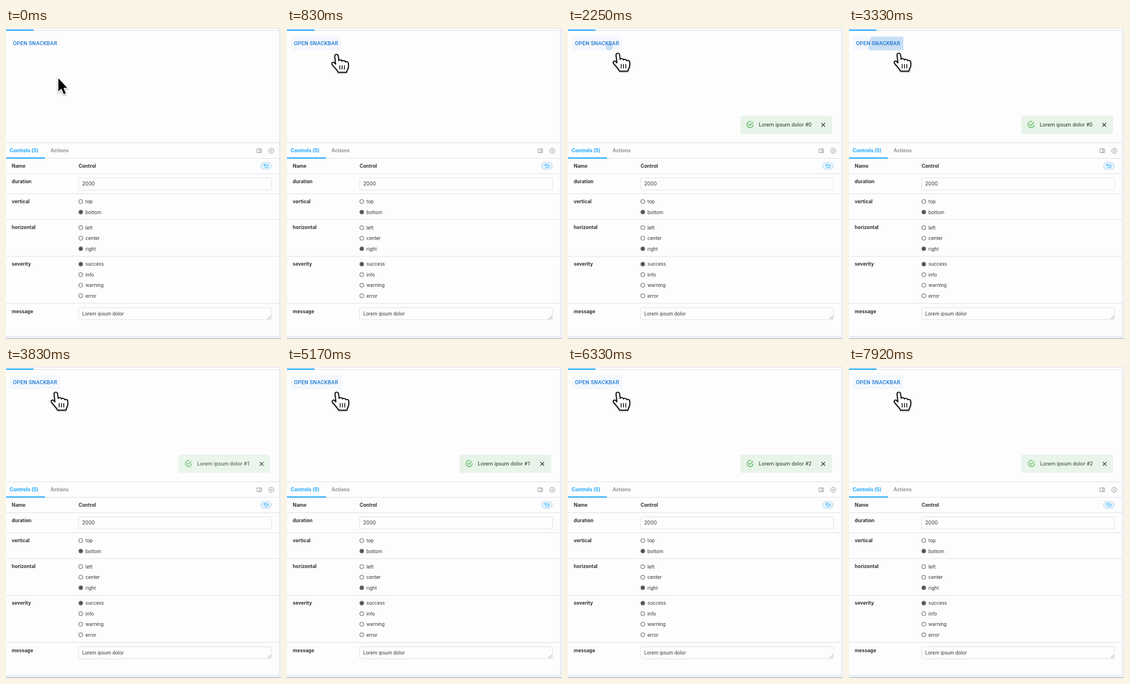
An HTML page for the animation above (8 s loop, 480 by 543 pixels).

```html
<!DOCTYPE html>
<html lang="en">
<head>
<meta charset="utf-8">
<title>Snackbar queue</title>
<style>
  html, body { margin: 0; width: 480px; height: 543px; overflow: hidden; }
  svg { display: block; }
  text { font: 8.25px Inter, sans-serif; fill: #333; white-space: pre; }
  .bold { font-size: 8.45px; font-weight: 700; }
  .roboto { font: 9.2px Roboto, sans-serif; letter-spacing: .0985px; }
  .button { font-weight: 500; letter-spacing: .263px; fill: #1976d2; }
  .line { fill: none; stroke: #dfe2e8; }
  .icon { fill: none; stroke: #8d8d92; stroke-width: .9; }
  .blue { fill: #1ea7fd; }
  .cursor { filter: drop-shadow(0 1.2px 1.2px #0006); }
</style>
</head>
<body>
<svg width="480" height="543" viewBox="0 0 480 543">
  <clipPath id="buttonClip"><rect x="7" y="15" width="88" height="24" rx="2.6"/></clipPath>

  <rect width="480" height="543" fill="#eef2f7"/>
  <path d="M0 0H477V536q0 2-2 2H0Z" fill="#fdfdfe"/>
  <path class="line" d="M477.3 0V536q0 2.3-2.3 2.3H0M0 .5H480M0 4.5H477M0 200.5H477M0 227.5H477"/>
  <path d="M0 542.5H480" stroke="#a4a7ac"/>
  <rect class="blue" y="2.6" width="48" height="2.2"/>
  <rect class="blue" y="226" width="68" height="2"/>

  <rect id="hover" x="7" y="15" width="88" height="24" rx="2.6" fill="#1976d2"/>
  <g id="ripples" clip-path="url(#buttonClip)" fill="#1976d2"></g>
  <text class="roboto button" x="12.2" y="30.4">OPEN SNACKBAR</text>

  <text class="bold" x="6.3" y="217" style="fill:#1ea7fd;font-size:8.7px">Controls (5)</text>
  <text class="bold" x="77.8" y="217" style="fill:#929297">Actions</text>
  <path class="icon" d="M438 211H446V217.6H438ZM443 211V217.6M444.4 212.8V213.6M444.4 214.8V215.6"/>
  <path class="icon" d="M461.2 212.6L464.8 216.2M464.8 212.6L461.2 216.2"/>
  <circle class="icon" cx="463" cy="214.4" r="4.4"/>

  <rect x="444.3" y="234.9" width="18.8" height="11.8" rx="5.9" fill="#e2f2fd" stroke="#b5d3e6" stroke-width=".9"/>
  <path d="M451.9 237.2L449.8 239.2L451.9 241.2M450 239.2H455.6Q457.6 239.2 457.6 241.2T455.6 243.2H451.6" fill="none" stroke="#1ea7fd"/>

  <g id="panel"></g>

  <rect class="line" x="126.7" y="261.5" width="336.8" height="21.3" rx="2.6"/>
  <text x="133" y="275.4" style="font-size:8.8px">2000</text>
  <rect class="line" x="126.7" y="488.3" width="336.8" height="21" rx="2.6"/>
  <text x="133" y="502">Lorem ipsum dolor</text>
  <path class="icon" d="M456.6 508.4L462.6 502.4M460 508.4L462.6 505.8"/>

  <g id="snackbar">
    <rect x="301" y="153" width="160" height="32" rx="2.6" fill="#e8f4e9"/>
    <g id="content">
      <g transform="translate(310.7 161.3) scale(.6)" fill="none" stroke="#4caf50" stroke-width="2">
        <path d="M21 12A9 9 0 1 1 14.8 3.5M7.2 10.8L11 14.6L20.3 5.3"/>
      </g>
      <text id="message" class="roboto" x="333" y="171.7" style="fill:#1e3a20"></text>
      <path d="M442.2 165.8L448.8 172.4M448.8 165.8L442.2 172.4" stroke="#1e2f20" stroke-width="1.2"/>
    </g>
  </g>

  <g class="cursor">
    <path id="arrow" d="M.6 .6V27.5L6.5 22.2L10.4 31.6L15.4 29.5L11.4 20.2H18.6Z" stroke="#fff" stroke-width="1.6" stroke-linejoin="round"/>
    <g id="hand" stroke="#000" stroke-width="1.7" stroke-linejoin="round" stroke-linecap="round">
      <path fill="#fff" d="M-3.1 3C-3.2-1 2.7-1 3 3L4 11C5 8.6 9.4 9 9.7 12C11 9.8 15 10.4 15.3 13.2C17.5 11.6 20.8 13 20.8 16V21C20.8 25 18 27 17.5 31.3H3C1.5 27-4 22.5-7.5 17.8C-9.4 14.6-6 12.4-3.6 14.8L-1.5 17Z"/>
      <path d="M5.8 19.5V26M9.8 19.5V26M13.8 19.5V26" fill="none" stroke-width="1.4"/>
    </g>
  </g>
</svg>
<script>
  const $ = id => document.getElementById(id);
  const clamp = u => Math.min(1, Math.max(0, u));
  const ease = u => (u = clamp(u), u * u * (3 - 2 * u));
  const set = (el, attrs) => { for (const key in attrs) el.setAttribute(key, attrs[key]); };

  const label = (x, y, s) => `<text class="bold" x="${x}" y="${y}">${s}</text>`;
  const radio = (y, s, checked) =>
    `<circle cx="130.5" cy="${y}" r="3.5" fill="${checked ? '#77777b' : '#fff'}" stroke="#5b5b60"/>` +
    (checked ? `<circle cx="130.5" cy="${y}" r="2.1" fill="#48484c"/>` : '') +
    `<text x="138.8" y="${y + 3.1}">${s}</text>`;

  // Row: name, label baseline, bottom rule, options, first option, checked option
  const rows = [
    ['duration', 271, 289.5, [], 0, 0],
    ['vertical', 306, 334.5, ['top', 'bottom'], 303, 1],
    ['horizontal', 351.4, 398.8, ['left', 'center', 'right'], 348.6, 2],
    ['severity', 415.4, 480.8, ['success', 'info', 'warning', 'error'], 412.3, 0],
    ['message', 497.6, 0, [], 0, 0],
  ];
  $('panel').innerHTML = label(10, 244, 'Name') + label(126.7, 244, 'Control') +
    '<path class="line" d="M0 254.5H477"/>' +
    rows.map(([name, y, rule, options, first, checked]) =>
      label(10, y, name) +
      (rule ? `<path class="line" d="M0 ${rule}H477"/>` : '') +
      options.map((s, i) => radio(first + i * 18.4, s, i === checked)).join('')
    ).join('');

  const LOOP = 8000, TICK = 1000 / 12;
  const clicks = [16, 27, 37, 53];   // in ticks
  $('ripples').innerHTML = clicks.map(() => '<circle cx="72" cy="33"/>').join('');
  const ripples = [...$('ripples').children];

  function drawCursor(time) {
    const u = ease((time - 290) / 630);
    const x = 90 - 3 * u - 15 * u * (1 - u), y = 85 - 41 * u;
    const over = y < 54;
    set($('arrow'), { transform: `translate(${x} ${y})`, visibility: over ? 'hidden' : 'visible' });
    set($('hand'), { transform: `translate(${x} ${y})`, visibility: over ? 'visible' : 'hidden' });
    set($('hover'), { opacity: over ? .04 : 0 });
  }

  function drawRipples(tick) {
    ripples.forEach((circle, i) => {
      const age = tick - clicks[i];
      const alive = age >= 0 && age < 10;
      set(circle, {
        r: 6.5 + 72 * ease(age * TICK / 550),
        opacity: alive ? .2 * Math.min(1, (9 - age) / 6) : 0,
      });
    });
  }

  // Each queued message takes 26 ticks: 24 on screen, 2 empty
  function drawSnackbar(tick) {
    const since = tick - 20, age = since % 26;
    const moving = age === 0 || age === 23;
    const opacity = since < 0 || age > 23 ? 0 : age === 0 ? .86 : age === 23 ? .93 : 1;
    set($('snackbar'), { opacity });
    set($('content'), { transform: `translate(${moving ? .7 : 0} 0)` });
    $('message').textContent = 'Lorem ipsum dolor #' + Math.max(0, Math.floor(since / 26));
  }

  function frame() {
    const tick = Math.floor((performance.now() % LOOP + 4) / TICK);
    drawCursor(tick * TICK);
    drawRipples(tick);
    drawSnackbar(tick);
    requestAnimationFrame(frame);
  }
  frame();
</script>
</body>
</html>
```
